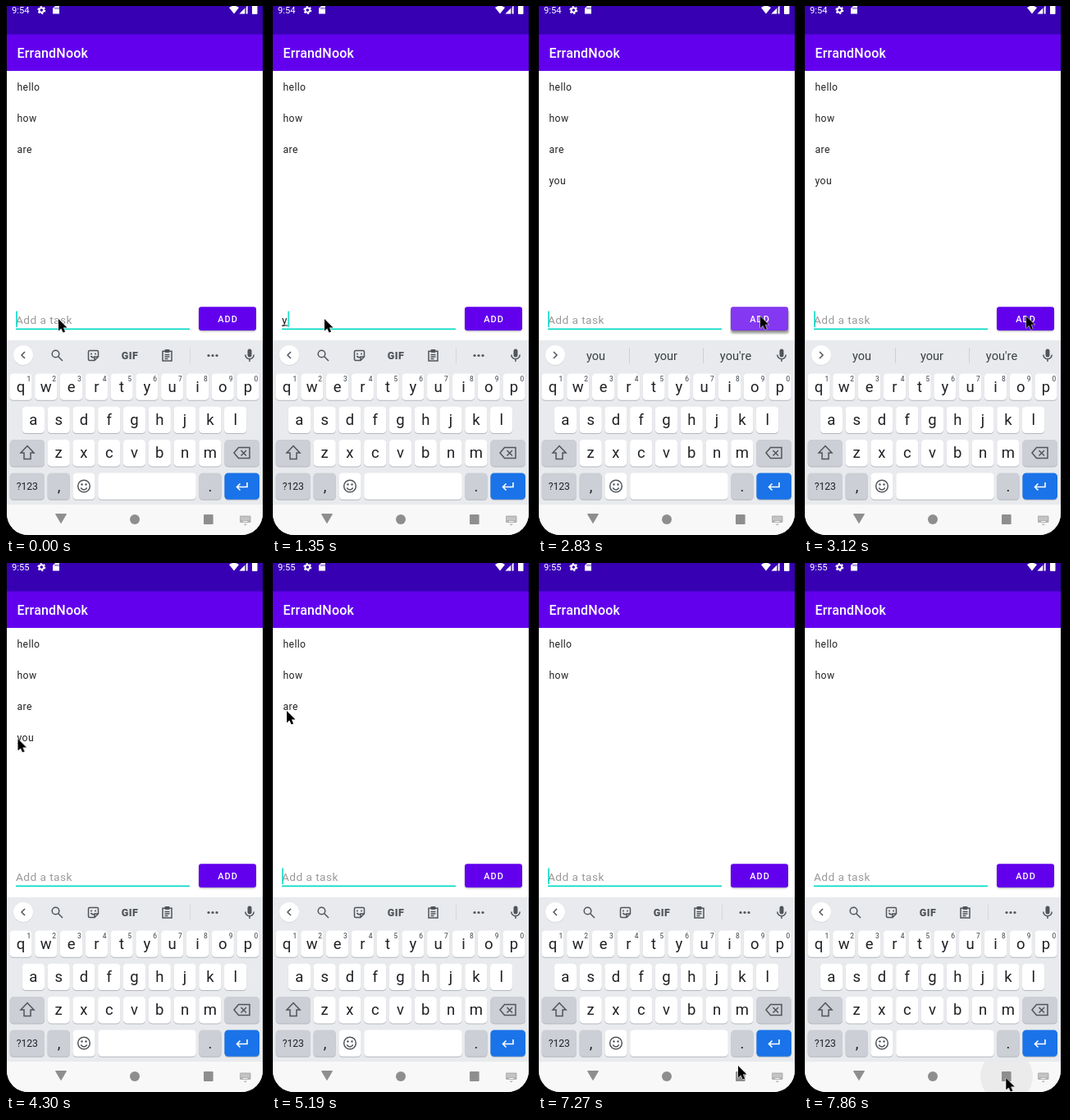
These frames come from a looping animation (317 by 644 pixels, 8000 ms). An HTML page:

```html
<!DOCTYPE html>
<html lang="en">
<head>
<meta charset="utf-8">
<title>To-do list</title>
<style>
html, body { margin: 0; width: 100%; height: 100%; overflow: hidden; background: #000; }
svg { display: block; width: 317px; height: 644px; font-family: Roboto, "Noto Sans", sans-serif; }
.item { font-size: 12.2px; letter-spacing: .38px; fill: #212121; }
.field { font-size: 13.7px; letter-spacing: .43px; fill: #212121; }
.word { font-size: 14.6px; fill: #3c4043; text-anchor: middle; }
.letter { font-size: 18.5px; fill: #202124; text-anchor: middle; }
.digit { font-size: 8.4px; font-weight: 500; fill: #5f6368; text-anchor: middle; }
.line { fill: none; stroke: #50555a; stroke-width: 1.5; }

/* Everything shares one hard-stepped 8 s clock. */
.t { animation: 8s step-end -5ms infinite; }
#mouse { animation-name: mouse; }
#caret { animation-name: blink; }
#caretPos { animation-name: advance; }
#hint { animation-name: hint; }
#y { animation-name: typeY; }
#yo { animation-name: typeYo; }
#you { animation-name: typeYou; }
#words { animation-name: words; }
#tools { animation-name: tools; }
#early { animation-name: early; }
#late { animation-name: late; }
#are { animation-name: are; }
#added { animation-name: added; }
#press { animation-name: press; }
#recents { animation-name: recents; }

@keyframes mouse {
  0% { transform: translate(64px, 381px); }
  24.375% { transform: translate(130px, 384px); }
  26.125% { transform: translate(228px, 378px); }
  28% { transform: translate(260px, 375px); }
  29.875% { transform: translate(267px, 377px); }
  31.625% { transform: translate(271px, 377.5px); }
  40.75% { transform: translate(218px, 350px); }
  44.5% { transform: translate(105px, 262px); }
  46.25% { transform: translate(28px, 216px); }
  48.125% { transform: translate(14.5px, 214px); }
  61.25% { transform: translate(15px, 205px); }
  63.125% { transform: translate(18px, 180px); }
  65% { transform: translate(20px, 163px); }
  66.75% { transform: translate(20.5px, 169px); }
  68.625% { transform: translate(20.5px, 172px); }
  81.625% { transform: translate(24px, 180px); }
  83.5% { transform: translate(48px, 238px); }
  85.25% { transform: translate(108px, 350px); }
  87.125% { transform: translate(180px, 475px); }
  89% { transform: translate(228px, 580px); }
  90.875% { transform: translate(244px, 612px); }
  92.625% { transform: translate(246px, 624px); }
  94.5%, 100% { transform: translate(246.3px, 627px); }
}
@keyframes blink {
  0%, 9.375%, 35.375%, 48.125%, 61.25%, 74.25%, 87.125% { opacity: 1; }
  3.75%, 29.875%, 44.5%, 53.75%, 66.75%, 81.625%, 94.5%, 100% { opacity: 0; }
}
@keyframes advance {
  0%, 35.375%, 100% { transform: none; }
  16.875% { transform: translateX(7.2px); }
  20.625% { transform: translateX(15.4px); }
  22.5% { transform: translateX(23.4px); }
}
@keyframes hint { 0%, 35.375%, 100% { opacity: 1; } 16.875% { opacity: 0; } }
@keyframes typeY { 0%, 20.625%, 100% { opacity: 0; } 16.875% { opacity: 1; } }
@keyframes typeYo { 0%, 22.5%, 100% { opacity: 0; } 20.625% { opacity: 1; } }
@keyframes typeYou { 0%, 35.375%, 100% { opacity: 0; } 22.5% { opacity: 1; } }
@keyframes words { 0%, 44.5%, 100% { opacity: 0; } 20.625% { opacity: 1; } }
@keyframes tools { 0%, 44.5%, 100% { opacity: 1; } 20.625% { opacity: 0; } }
@keyframes early { 0% { opacity: 1; } 46.25%, 100% { opacity: 0; } }
@keyframes late { 0% { opacity: 0; } 46.25%, 100% { opacity: 1; } }
@keyframes are { 0% { opacity: 1; } 74.25%, 100% { opacity: 0; } }
@keyframes added { 0%, 57.5%, 100% { opacity: 0; } 35.375% { opacity: 1; } }
@keyframes press { 0%, 39%, 100% { opacity: 0; } 35.375% { opacity: 1; } 37.25% { opacity: .5; } }
@keyframes recents { 0% { opacity: 0; } 98.25%, 100% { opacity: 1; } }
</style>
</head>
<body>
<svg viewBox="0 0 317 644">
  <defs>
    <clipPath id="screen"><path d="M1 0H313V618A26 26 0 0 1 287 644H27A26 26 0 0 1 1 618Z"/></clipPath>
    <clipPath id="nav"><path d="M1 607H313V644H1Z"/></clipPath>
    <filter id="soft" x="-20%" y="-30%" width="140%" height="170%"><feGaussianBlur stdDeviation="1.2"/></filter>
  </defs>
  <rect width="317" height="644"/>
  <g clip-path="url(#screen)">
    <rect width="317" height="644" fill="#fff"/>

    <!-- status and title bars -->
    <rect width="317" height="35" fill="#3700b3"/>
    <rect y="34.5" width="317" height="44.5" fill="#6200ee"/>
    <g fill="#fff">
      <g font-size="11.2">
        <text id="early" class="t" x="7" y="9">9:54</text>
        <text id="late" class="t" x="7" y="9">9:55</text>
      </g>
      <circle cx="43.3" cy="5" r="2.8" fill="none" stroke="#fff" stroke-width="2"/>
      <circle cx="43.3" cy="5" r="4.3" fill="none" stroke="#fff" stroke-width="1.4" stroke-dasharray="2.25"/>
      <path d="M60 0H65V9.5H57V3Z"/>
      <path d="M60 1.5V4M62 1.5V4M64 1.5V4" stroke="#3700b3" stroke-width=".8"/>
      <path d="M272 2Q278-2.500 284 2L278 9.500Z"/>
      <path d="M294.500-.5V9.500H284.500Z" fill-opacity=".35"/>
      <path d="M291 3V9.500H284.500Z"/>
      <path d="M294.500-.5V9.500H293V1Z"/>
      <rect x="300" y="-1" width="6.500" height="11" rx="1"/>
      <text x="13.5" y="63" font-size="16" font-weight="500" letter-spacing=".2">ErrandNook</text>
    </g>

    <!-- list -->
    <g class="item">
      <text x="13.5" y="103">hello</text>
      <text x="13.5" y="141">how</text>
      <text id="are" class="t" x="13.5" y="179">are</text>
      <text id="added" class="t" x="13.5" y="217">you</text>
    </g>

    <!-- entry field -->
    <g class="field">
      <text id="hint" class="t" x="12" y="387" fill="#9a9a9a" style="fill:#9a9a9a">Add a task</text>
      <g id="y" class="t"><text x="12" y="387">y</text><path d="M12 389H19" stroke="#212121"/></g>
      <g id="yo" class="t"><text x="12" y="387">yo</text><path d="M12 389H27" stroke="#212121"/></g>
      <g id="you" class="t"><text x="12" y="387">you</text><path d="M12 389H35.400" stroke="#212121"/></g>
    </g>
    <g id="caretPos" class="t"><rect id="caret" class="t" x="12.200" y="371.500" width="1.600" height="19.500" fill="#03dac5"/></g>
    <rect x="12" y="392.500" width="212" height="1.700" fill="#03dac5"/>

    <!-- button -->
    <rect x="235.500" y="368" width="69" height="28" rx="3" opacity=".35" filter="url(#soft)"/>
    <g id="press" class="t">
      <rect x="235" y="370" width="71" height="29" rx="3" opacity=".3" filter="url(#soft)"/>
    </g>
    <rect x="235" y="366.300" width="70" height="28.700" rx="3" fill="#6200ee"/>
    <g class="t" style="animation-name:press"><rect x="235" y="366.300" width="70" height="28.700" rx="3" fill="#fff" opacity=".22"/></g>
    <text x="270.500" y="385" font-size="11" font-weight="500" letter-spacing="1" fill="#fff" text-anchor="middle">ADD</text>

    <!-- keyboard -->
    <rect y="407" width="317" height="200" fill="#e8eaed"/>
    <circle cx="21" cy="425.600" r="12.200" fill="#cfd2d6"/>
    <circle cx="21" cy="425" r="12" fill="#fff"/>
    <g id="tools" class="t">
      <path class="line" d="M23 421L19 425L23 429"/>
      <g class="line">
        <circle cx="60.500" cy="423.500" r="4.300"/>
        <path d="M63.700 426.700L69 432"/>
        <path d="M102 419.500H111Q112.500 419.500 112.500 421V427L108 431.500H102Q100.500 431.500 100.500 430V421Q100.500 419.500 102 419.500ZM112 427H108V431M103.500 426Q105 428.500 107.500 427.500"/>
        <path d="M191 420.200H202V432H191ZM193.500 424.500H199.500M193.500 427H199.500M193.500 429.500H197.500"/>
      </g>
      <g fill="#50555a">
        <circle cx="104" cy="423.500" r="1"/><circle cx="109" cy="423.500" r="1"/>
        <rect x="193.500" y="418" width="6" height="4" rx="1"/>
        <text x="151" y="429.500" font-size="12.500" font-weight="900" letter-spacing=".4" text-anchor="middle">GIF</text>
        <circle cx="247" cy="425.500" r="1.600"/><circle cx="252" cy="425.500" r="1.600"/><circle cx="257" cy="425.500" r="1.600"/>
      </g>
      <path d="M224.500 416V435" stroke="#d5d8dc"/>
    </g>
    <g id="words" class="t">
      <path class="line" d="M19 421L23 425L19 429"/>
      <g class="word"><text x="70.500" y="431">you</text><text x="156" y="431">your</text><text x="241" y="431">you're</text></g>
      <path d="M111.500 416V435M201.500 416V435" stroke="#cdd0d4"/>
    </g>
    <rect x="294.500" y="417.500" width="5" height="10" rx="2.500" fill="#50555a"/>
    <path class="line" d="M291.800 424.500A5.200 5.200 0 0 0 302.200 424.500M297 429.500V433"/>

    <g id="keys"></g>
    <g class="line">
      <path d="M26 535.500L34 544H30V551.500H22V544H18Z"/>
      <path d="M283.500 537.500H297V550.500H283.500L278 544ZM286.500 541L293 547.500M293 541L286.500 547.500"/>
      <circle cx="95" cy="584.500" r="7.300"/>
      <path d="M91.200 586.500Q95 591.500 98.800 586.500"/>
    </g>
    <circle cx="92.500" cy="582.500" r="1.200" fill="#50555a"/><circle cx="97.500" cy="582.500" r="1.200" fill="#50555a"/>
    <path d="M294 580V585.500H281.500M285.500 581.500L281.500 585.500L285.500 589.500" fill="none" stroke="#fff" stroke-width="1.600"/>

    <!-- navigation -->
    <rect y="607" width="317" height="37" fill="#f8f8f8"/>
    <g clip-path="url(#nav)"><circle id="recents" class="t" cx="247" cy="625" r="32" fill="#ebebeb"/></g>
    <g fill="#8e8e8e">
      <path d="M60.500 618.500H73.500L67 629.500Z" stroke="#8e8e8e" stroke-linejoin="round"/>
      <circle cx="157" cy="625" r="6"/>
      <rect x="241" y="619" width="11.600" height="12" rx=".8"/>
      <rect x="285" y="620.500" width="13.500" height="8.500" rx="1" fill="#b2b2b2"/>
    </g>
    <path d="M286.500 623H297M286.500 625H297" stroke="#f8f8f8" stroke-dasharray="1 1"/>
    <path d="M289 627.500H294.500" stroke="#f8f8f8"/>
    <path d="M289.500 630.500H294L291.800 632.500Z" fill="#b2b2b2"/>
  </g>

  <path id="mouse" class="t" d="M0 0V14.500L3.300 11.500L5.600 16.500L8.100 15.400L5.900 10.400H10.500Z" stroke="#fff" stroke-width="1" paint-order="stroke"/>
</svg>
<script>
const keys = document.getElementById('keys');
const PITCH = 30.78, GREY = '#cccfd5';

function add(tag, attrs, text = '') {
  const el = document.createElementNS('http://www.w3.org/2000/svg', tag);
  for (const name in attrs) el.setAttribute(name, attrs[name]);
  el.textContent = text;
  keys.append(el);
}

function key(x, row, width, fill = '#fff') {
  const y = 447.5 + row * 40.3;
  const box = { x, width, height: 32.3, rx: 4.5 };
  add('rect', { ...box, y: y + 1, fill: '#b4b8be' });
  add('rect', { ...box, y, fill });
}

function label(x, row, text, size = 18.5) {
  add('text', { x, y: 469.5 + row * 40.2, class: 'letter', style: `font-size:${size}px` }, text);
}

['qwertyuiop', 'asdfghjkl', 'zxcvbnm'].forEach((letters, row) => {
  [...letters].forEach((letter, i) => {
    const x = 18 + PITCH * (i + row * (row + 1) / 4);
    key(x - 13.6, row, 27.2);
    label(x, row, letter);
    if (!row) add('text', { x: x + 9.8, y: 456.5, class: 'digit' }, (i + 1) % 10);
  });
});

key(4.6, 2, 42.4, GREY);
key(266.4, 2, 42.6, GREY);
key(4.6, 3, 42.4, GREY);
key(50.6, 3, 27.2, GREY);
key(81.4, 3, 27.2);
key(112.2, 3, 119.6);
key(235.4, 3, 27.2, GREY);
key(266.4, 3, 42.6, '#1a73e8');
label(25.8, 2.97, '?123', 12.2);
label(64.5, 3.02, ',');
label(249, 3.02, '.');
</script>
</body>
</html>
```
